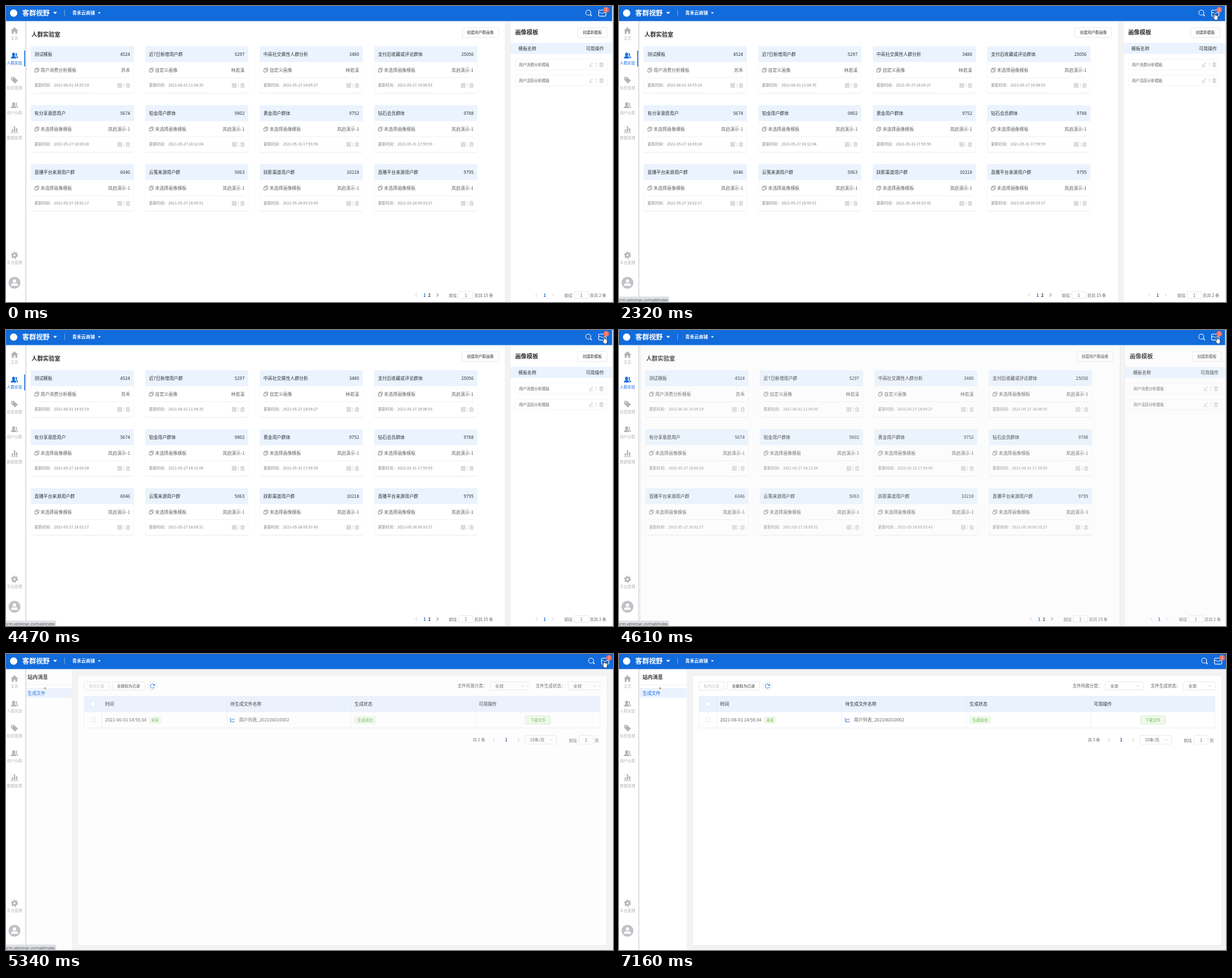
Write an HTML page that moves like this. It is 1072 px wide and 522 px high and loops after 7290 ms.

```html
<!DOCTYPE html>
<html lang="zh-CN">
<head>
<meta charset="utf-8">
<title>人群实验室</title>
<style>
html, body { margin: 0; width: 100%; height: 100%; overflow: hidden; background: #fff; }
svg { display: block; width: 100%; height: 100%; }
text { font-family: "Noto Sans CJK SC", "Noto Sans CJK", "Noto Sans SC", sans-serif; white-space: pre; }
</style>
</head>
<body>
<svg id="stage" viewBox="0 0 1072 522" xmlns="http://www.w3.org/2000/svg"></svg>
<script>
const LOOP = 7290, TOP = 26.6;
const BLUE = '#126bdb', PALE = '#eaf3fe', GREY = '#b4b4b4', LINE = '#dcdfe6';
const INK = '#303133', BODY = '#606266', MUTED = '#828282', GREEN = '#67b846';

// y is the visual middle of the line
const txt = (x, y, s, size = 7.9, fill = INK, opt = '') =>
  `<text x="${x}" y="${y + size * 0.37}" font-size="${size}" fill="${fill}" ${opt}>${s}</text>`;
const END = 'text-anchor="end"', MID = 'text-anchor="middle"', BOLD = 'font-weight="700"';
const rect = (x, y, w, h, fill, opt = '') =>
  `<rect x="${x}" y="${y}" width="${w}" height="${h}" fill="${fill}" ${opt}/>`;
const box = (x, y, w, h, stroke = LINE, fill = '#fff', r = 1.5) =>
  rect(x, y, w, h, fill, `stroke="${stroke}" stroke-width=".7" rx="${r}"`);
const path = (d, stroke, w = 0.8, opt = '') =>
  `<path d="${d}" fill="none" stroke="${stroke}" stroke-width="${w}" ${opt}/>`;
const shape = (d, fill, opt = '') => `<path d="${d}" fill="${fill}" ${opt}/>`;
const dot = (x, y, r, fill, opt = '') => `<circle cx="${x}" cy="${y}" r="${r}" fill="${fill}" ${opt}/>`;
const at = (x, y, s, id = '') => `<g ${id && `id="${id}"`} transform="translate(${x} ${y})">${s}</g>`;

const arrowL = (x, y, c) => path(`M${x + 1.4} ${y - 2.8}l-2.8 2.8l2.8 2.8`, c);
const arrowR = (x, y, c) => path(`M${x - 1.4} ${y - 2.8}l2.8 2.8l-2.8 2.8`, c);
const arrowD = (x, y) => path(`M${x - 2.4} ${y - 1.2}l2.4 2.4l2.4 -2.4`, '#b4b8bf', 0.7);

const copyIcon = (x, y) => at(x, y,
  path('M2.4 2.2V.5H7.6V5.6H5.8M.5 2.4H5.6V7.5H.5Z', '#777', 0.8));
const gridIcon = (x, y) => at(x, y, [0, 4.2].map(i => [0, 4.2].map(j =>
  path(`M${i + .4} ${j + .4}h2.8v2.8h-2.8z`, '#b5b5b5', 0.8)).join('')).join(''));
const trashIcon = (x, y) => at(x, y,
  path('M0 1.6H7M2.4 1.4V.4H4.6V1.4M1 1.8V7.4H6V1.8M2.8 3.2V6M4.2 3.2V6', '#b5b5b5', 0.8));
const penIcon = (x, y) => at(x, y,
  path('M1.2 5.6L5.6 .8L6.6 1.8L2.4 6L1 6.4ZM0 7.5H7', '#b8b8b8', 0.7));

const people = shape('M-6.5 5C-6.5 2.2 -4.5 1.4 -3 .9C-5 -1 -4.6 -5.2 -1.6 -5.2C1.4 -5.2 1.8 -1 -.2 .9C1.4 1.4 3.3 2.2 3.3 5Z'
  + 'M1.6 -4.8C4.7 -5.4 5.4 -1.3 3.3 .7C5 1.2 6.5 2 6.5 4.4H4.3C4.2 2.2 3 1.2 1.7 .6C2.8 -1 2.9 -3.2 1.6 -4.8Z', 'currentColor');
const home = shape('M0 -6L6.8 0H4.8V5.8H1.5V1.8H-1.5V5.8H-4.8V0H-6.8Z', 'currentColor');
const tag = shape('M-6 -5.6H-1L6 1L.8 6.2L-6 -.4ZM-3.6 -4.2a1.2 1.2 0 1 0 .01 0Z', 'currentColor', 'fill-rule="evenodd"');
const bars = shape('M-6.3 5H6.3V6H-6.3ZM-5 -.6H-2.6V4H-5ZM-1.2 -6H1.2V4H-1.2ZM2.6 -2.6H5V4H2.6Z', 'currentColor');
const gear = '<circle r="3.3" fill="none" stroke="currentColor" stroke-width="2.8"/>'
  + '<circle r="5.2" fill="none" stroke="currentColor" stroke-width="2.2" stroke-dasharray="2.5 2.95"/>';

const navItem = (icon, y, labelY, label, id) =>
  `<g ${id ? `id="${id}"` : ''} style="color:${GREY}">${at(15, y, icon)}`
  + txt(15, labelY, label, 6.75, 'currentColor', MID) + '</g>';

const sidebar = rect(34, TOP, 1, 496, '#d9d9d9') + rect(35, TOP, 1.5, 496, '#ebebeb')
  + rect(0, TOP, 34, 496, '#fff')
  + navItem(home, 43.5, 57, '主页')
  + navItem(people, 87.5, 101, '人群实验', 'lab')
  + navItem(tag, 130.5, 144.5, '标签管理')
  + navItem(people, 175, 188.5, '用户分群')
  + navItem(bars, 218, 232.5, '数据管理')
  + navItem(gear, 439.5, 453, '平台管理')
  + `<rect id="mark" x="32.2" y="78.5" width="1.6" height="28" fill="${BLUE}"/>`
  + dot(15, 488, 10.5, '#bfc2c7') + dot(15, 485, 3, '#fff')
  + shape('M8.8 493.6C8.8 490 11.5 488.9 13 488.6L15 490L17 488.6C18.5 488.9 21.2 490 21.2 493.6Z', '#fff');

const header = rect(0, 0, 1072, TOP, BLUE)
  + dot(13.5, 12.5, 6.5, '#fff')
  + txt(28.8, 12.5, '客群视野', 12.1, '#fff', 'font-weight="900"')
  + shape('M83.3 10.4H90.3L86.8 14.2Z', '#fff')
  + rect(103, 7, 0.8, 11, '#8db8ef')
  + txt(117, 12.5, '青禾云商铺', 8, '#fff', BOLD)
  + shape('M162.4 11H167.4L164.9 13.7Z', '#fff')
  + at(0, 0,
    '<circle cx="1028.4" cy="11.7" r="4.5" fill="none" stroke="#fff" stroke-width="1.1"/>'
    + path('M1031.8 15L1034.6 17.8', '#fff', 1.6)
    + '<rect x="1046.6" y="7.3" width="13" height="10.6" rx="1.8" fill="none" stroke="#fff" stroke-width="1.1"/>'
    + path('M1046.8 11.5H1050.2C1051 13.6 1055.2 13.6 1056 11.5H1059.4', '#fff', 1)
    + dot(1060, 6.8, 5, '#f56c5c') + txt(1060, 6.8, '1', 6.4, '#fff', MID), 'tools');

const PEOPLE = ['苏禾', '林若溪', '岚启演示-1'];
const TEMPLATES = ['用户消费分析模板', '自定义画像', '未选择画像模板'];
const CARDS = [
  ['测试模板', '4524', 0, 0, '06-01 14:55:19'],
  ['近7日新增用户群', '5297', 1, 1, '06-01 11:04:35'],
  ['中高社交属性人群分析', '3480', 1, 1, '05-27 18:09:27'],
  ['支付后收藏或评论群体', '25056', 2, 2, '05-27 18:08:53'],
  ['有分享意愿用户', '5674', 2, 2, '05-27 18:09:28'],
  ['铂金用户群体', '9802', 2, 2, '05-27 18:12:04'],
  ['黄金用户群体', '9752', 2, 2, '05-31 17:59:59'],
  ['钻石会员群体', '9788', 2, 2, '05-31 17:59:59'],
  ['直播平台来源用户群', '6046', 2, 2, '05-27 18:02:17'],
  ['云笺来源用户群', '5063', 2, 2, '05-27 18:09:51'],
  ['跃影渠道用户群', '10218', 2, 2, '05-28 09:33:43'],
  ['直播平台来源用户群', '9795', 2, 2, '05-28 09:33:27']
];

function card([name, count, tpl, owner, time], i) {
  return at(44 + (i % 4) * 202.2, 71 + Math.floor(i / 4) * 104,
    rect(-.3, .5, 182, 83, '#e9e9e9', 'rx="2"') + rect(0, 0, 181.4, 82.4, '#fff', 'rx="1.5"')
    + rect(0, 0, 181.4, 28, PALE)
    + txt(6.3, 14.5, name) + txt(175.2, 14.5, count, 7.9, INK, END)
    + copyIcon(6.4, 38) + txt(17, 42, TEMPLATES[tpl], 7.95, BODY)
    + txt(175.2, 42, PEOPLE[owner], 7.95, BODY, END)
    + rect(6, 55.2, 169.5, 0.7, '#ebebeb')
    + txt(6.3, 68.5, '更新时间：', 6.7, MUTED) + txt(40.6, 68.5, '2021-' + time, 6.7, MUTED)
    + gridIcon(153, 65.2) + rect(164, 65.4, 0.7, 7.4, '#ccc') + trashIcon(168, 65.3));
}

const pager = (x, total) => txt(x, 510, '前往', 7.3, BODY) + box(x + 17.4, 503.6, 25.4, 12)
  + txt(x + 30, 510, '1', 7.3, BODY, MID) + txt(x + 45, 510, `页共 ${total} 条`, 7.3, BODY);
const button = (x, y, w, h, s, fill = INK) => box(x, y, w, h) + txt(x + w / 2, y + h / 2, s, 6.75, fill, MID);
const templateRow = (y, s) => box(899.5, y, 162, 18.5, '#efefef') + txt(905.7, y + 9.3, s, 6.75, BODY)
  + penIcon(1029.5, y + 5.4) + rect(1042, y + 5, 0.7, 8.5, '#ccc') + trashIcon(1048, y + 5.6);

const labPage = rect(36, TOP, 846, 496, '#fff') + rect(881.6, TOP, 1, 496, '#e6e6e6')
  + rect(890.5, TOP, 180, 496, '#fff') + rect(890, TOP, .8, 496, '#ebebeb')
  + txt(45, 50, '人群实验室', 10.2, INK, BOLD)
  + button(805.5, 38.2, 64.5, 17.3, '创建用户群画像')
  + CARDS.map(card).join('')
  + arrowL(724.6, 509.6, '#aaa') + txt(739.4, 509.8, '1', 7.3, BLUE, `${MID} ${BOLD}`)
  + txt(747.6, 509.8, '2', 7.3, INK, `${MID} ${BOLD}`) + arrowR(762, 509.6, INK)
  + pager(782, 15)
  + txt(899.2, 46.5, '画像模板', 10.2, INK, BOLD)
  + button(1009.8, 38.2, 51.4, 17.3, '创建新模板')
  + rect(891, 65, 179.5, 19.5, PALE)
  + txt(905, 75, '模板名称') + txt(1055.8, 75, '可用操作', 7.9, INK, END)
  + templateRow(94, '用户消费分析模板') + templateRow(122, '用户活跃分析模板')
  + arrowL(937, 509.6, '#bbb') + txt(951.4, 509.8, '1', 7.3, BLUE, `${MID} ${BOLD}`)
  + arrowR(965.7, 509.6, '#bbb') + pager(986, 2);

const select = (x, y, w, h, s) => box(x, y, w, h) + txt(x + 9, y + h / 2 + .2, s, 7.3, BODY)
  + arrowD(x + w - 9.5, y + h / 2 + .2);
const chip = (x, y, w, h, s, size, edge) => box(x, y, w, h, edge, '#f0f9eb')
  + txt(x + w / 2, y + h / 2, s, size, GREEN, MID);

const mailPage = rect(35, TOP, 84.5, 496, '#fff')
  + txt(41.5, 40.3, '站内消息', 9, INK, BOLD) + rect(35, 53.8, 84.5, 0.7, '#ebebeb')
  + rect(35, 60, 84.5, 17, '#eaf2fe') + txt(41.5, 69.2, '生成文件', 7.9, BLUE, 'font-weight="500"')
  + dot(72.5, 60.5, 1.7, '#e0904c')
  + rect(129.4, 37.4, 935.6, 477.6, '#e7e7e7', 'rx="2"') + rect(130.2, 38, 934, 476, '#fff', 'rx="1.5"')
  + button(141.5, 49, 44, 14.6, '标为已读', '#b9bcc2') + button(191.3, 49, 57, 14.6, '全部标为已读')
  + dot(262.2, 56.5, 8, '#fff', 'stroke="#dedede" stroke-width=".8"')
  + path('M265.6 55A3.7 3.7 0 1 0 265.7 57.8', BLUE, 1) + shape('M266.6 52.8V56H263.4Z', BLUE)
  + txt(801, 56.5, '文件所属分类：', 7.5, BODY) + select(858.6, 49, 67, 14.4, '全部')
  + txt(939, 56.5, '文件生成状态：', 7.5, BODY) + select(996.6, 49, 56, 14.4, '全部')
  + rect(141.5, 74.5, 911, 56, '#fff', 'stroke="#e8ecf3" stroke-width=".8"')
  + rect(141.5, 74.5, 911, 28, '#eaf2fe')
  + [172.3, 393.4, 613.2, 832.8].map(x => rect(x, 74.5, 0.7, 28, '#e0e9f6') + rect(x, 102.5, 0.7, 28, '#e8ecf3')).join('')
  + box(153.3, 84.3, 7.8, 7.8) + box(153.3, 112.2, 7.8, 7.8)
  + [[178.5, '时间'], [399.5, '待生成文件名称'], [619, '生成状态'], [838.6, '可用操作']]
    .map(([x, s]) => txt(x, 88.4, s)).join('')
  + txt(178.5, 116, '2021-06-01 14:55:34', 7.9, BODY)
  + chip(256.8, 111, 19.6, 11.2, '未读', 6.4, '#e1f3d8')
  + path('M399.8 112.4V119.6H407.4M400.8 117.6L403 114.8L404.8 116.6L407.2 113.4', BLUE, 0.9)
  + txt(415, 116, '用户列表_202106010002', 7.9, BODY)
  + chip(619.3, 110, 36.8, 12.8, '生成成功', 6.75, '#e1f3d8')
  + chip(921, 109.2, 44, 14.2, '下载文件', 6.75, '#c2e7b0')
  + txt(828, 151.2, '共 1 条', 7.3, BODY) + arrowL(865.4, 151.2, '#aaa')
  + txt(887, 151.2, '1', 7.3, '#274f86', `${MID} ${BOLD}`) + arrowR(908.5, 151.2, '#aaa')
  + select(920, 143.5, 56, 15.4, '10条/页')
  + txt(997.5, 152, '前往', 7.3, BODY) + box(1015.3, 143.5, 25.4, 15.4)
  + txt(1028, 152, '1', 7.3, BODY, MID) + txt(1043, 152, '页', 7.3, BODY);

const status = rect(-2, 513, 90, 12, '#dee1e6', 'rx="1.5" stroke="#c9ccd1" stroke-width=".6"')
  + txt(-.5, 518.6, 'crm.velnimar.cn/mail/index', 6.8, '#45494e', 'style="font-family:\'Open Sans\',sans-serif"');

const pointer = '<path id="arrow" d="M0 0V9.2L2.1 7.3L3.6 10.6L5.1 9.9L3.7 6.7H6.6Z" fill="#fff" stroke="#111" stroke-width=".7"/>'
  + '<path id="hand" d="M-1 .6C-1 -.4 .8 -.4 .8 .6V4C1.4 3.4 2.4 3.6 2.5 4.3C3.1 3.9 3.9 4.1 4 4.8C4.6 4.4 5.3 4.7 5.3 5.5V8.6C5.3 10 4.6 10.6 4.4 12.2H-.4C-.6 10.8 -2.2 9 -3 7.4C-3.4 6.4 -2.2 5.8 -1 7.2Z"'
  + ' fill="#fff" stroke="#111" stroke-width=".7"/>';

const stage = document.getElementById('stage');
stage.innerHTML = rect(0, 0, 1072, 522, '#f3f3f3')
  + at(0, 0, labPage, 'labPage') + at(0, 0, mailPage, 'mailPage')
  + sidebar + header
  + `<g id="gutter">${rect(1070.5, 0, 1.5, 522, '#e9ebee')}</g>`
  + `<g id="status">${status}</g>` + at(0, 0, pointer, 'cursor');
const ui = Object.fromEntries(['labPage', 'mailPage', 'lab', 'mark', 'tools', 'gutter', 'status', 'cursor', 'arrow', 'hand']
  .map(id => [id, document.getElementById(id)]));

const clamp = v => Math.max(0, Math.min(1, v));
const span = (t, a, b) => clamp((t - a) / (b - a));
const show = (node, on) => node.setAttribute('visibility', on ? 'visible' : 'hidden');

// cursor hotspot: time, x, y
const TRACK = [
  [460, 1052, 521], [700, 915, 400], [950, 705, 250], [1160, 734, 191],
  [1530, 943.5, 46], [1870, 1047, 19], [2020, 1047, 19],
  [2400, 1054, 11], [2720, 1058, 8], [2750, 1058, 8], [2870, 1061, 6],
  [2980, 1059.3, 9.6], [3130, 1047, 18.5], [3290, 1056, 11.5], [3510, 1056, 11.5], [3520, 1056.5, 12],
  [6150, 1056.5, 12], [6500, 1051, 260], [6850, 1046, 501], [7010, 1052, 521], [7160, 1052, 521]
];

function slope(i, k) {
  const a = TRACK[i - 1], b = TRACK[i], c = TRACK[i + 1];
  if (!a || !c || a[2] === b[2] || b[2] === c[2]) return 0;
  return (c[k] - a[k]) / (c[0] - a[0]);
}

function cursorAt(t) {
  const i = TRACK.findIndex((p, n) => n < TRACK.length - 1 && t < TRACK[n + 1][0]);
  const a = TRACK[i], b = TRACK[i + 1], d = b[0] - a[0], u = (t - a[0]) / d, v = 1 - u;
  return [1, 2].map(k => a[k] * (1 + 2 * u) * v * v + b[k] * u * u * (3 - 2 * u)
    + d * u * v * (v * slope(i, k) - u * slope(i + 1, k)));
}

function draw(t) {
  const mail = t >= 5100;
  show(ui.labPage, !mail);
  show(ui.mailPage, mail);
  show(ui.gutter, !mail);
  ui.tools.setAttribute('transform', `translate(${mail ? 5 : 0} 0)`);

  const out = span(t, 4550, 4900);
  ui.labPage.setAttribute('transform', `translate(${16.5 * out} 0)`);
  ui.labPage.setAttribute('opacity', 1 - 0.97 * out);

  const rest = (1 - span(t, 5080, 5590)) ** 3;
  ui.mailPage.setAttribute('transform', `translate(${-30 * rest} 0)`);
  ui.mailPage.setAttribute('opacity', 1 - rest);

  const idle = span(t, 4600, 4850);
  const tint = [18, 107, 219].map(c => Math.round(c + (180 - c) * idle));
  ui.lab.style.color = `rgb(${tint})`;
  show(ui.mark, t < 4560);
  show(ui.status, t >= 2150 && t < 6400);

  const visible = t >= 460 && t < 7160;
  const [x, y] = visible ? cursorAt(t) : [0, 0];
  const hand = t >= 2100 && y < 20;
  ui.cursor.setAttribute('transform', `translate(${x.toFixed(2)} ${y.toFixed(2)})`);
  show(ui.arrow, visible && !hand);
  show(ui.hand, visible && hand);
}

const start = performance.now();
function tick() {
  draw((performance.now() - start) % LOOP);
  requestAnimationFrame(tick);
}
tick();
</script>
</body>
</html>
```
